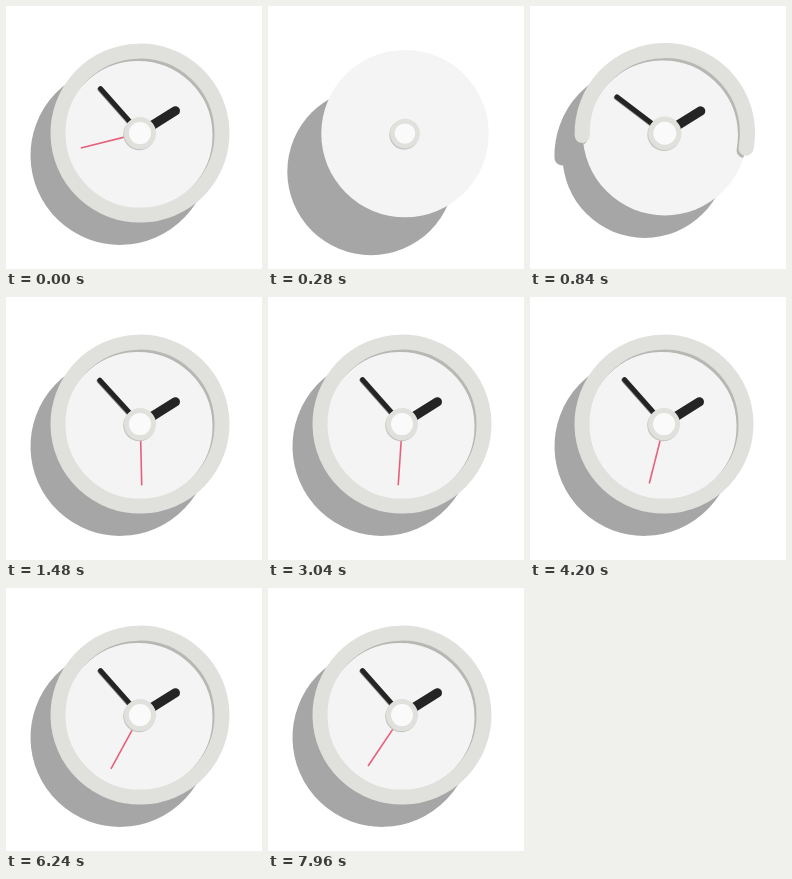
An HTML page with a canvas that plays this animation: 256x263 px, repeating every 8000 ms.

```html
<!DOCTYPE html>
<html lang="en">
<head>
<meta charset="utf-8">
<title>Wall clock</title>
<style>
  html, body { margin: 0; width: 100%; height: 100%; overflow: hidden; background: #fff; }
  canvas { display: block; width: 256px; height: 263px; }
</style>
</head>
<body>
<canvas id="stage" width="256" height="263"></canvas>
<script>
const ctx = document.getElementById('stage').getContext('2d');
const LOOP = 8000, TAU = Math.PI * 2;
const RIM = '#e0e1dc', FACE = '#f4f4f4', SHADOW = '#a6a6a6', INK = '#242424', RED = '#e6607a';

const progress = (t, start, length) => Math.min(1, Math.max(0, (t - start) / length));
const easeOut = u => 1 - (1 - u) ** 3;
const easeInOut = u => (1 - Math.cos(Math.PI * u)) / 2;
const smooth = u => u * u * (3 - 2 * u);
const radians = degrees => degrees * Math.PI / 180;

function disc(x, y, radius, color) {
  ctx.beginPath();
  ctx.arc(x, y, Math.max(0, radius), 0, TAU);
  ctx.fillStyle = color;
  ctx.fill();
}

function rim(x, y, sweep, color) {
  if (sweep <= 0) return;
  const start = radians(178.5);
  ctx.beginPath();
  ctx.arc(x, y, 82, start, start + sweep * TAU);
  ctx.strokeStyle = color;
  ctx.lineWidth = 15;
  ctx.lineCap = 'round';
  ctx.stroke();
}

// Angles run clockwise from twelve o'clock.
function hand(angle, length, width, color, dx = 0, dy = 0, cap = 'round') {
  if (length <= 0) return;
  const a = radians(angle);
  ctx.beginPath();
  ctx.moveTo(dx, dy);
  ctx.lineTo(dx + length * Math.sin(a), dy - length * Math.cos(a));
  ctx.strokeStyle = color;
  ctx.lineWidth = width;
  ctx.lineCap = cap;
  ctx.stroke();
}

// Each second jumps a little too far, then sags back before the next jump.
function secondAngle(t) {
  const ticks = Math.floor((t - 120) / 1000);
  const elapsed = t - 120 - ticks * 1000;
  const jump = 7.3 * smooth(progress(elapsed, 0, 140));
  const sag = 1.3 * progress(elapsed, 140, 860);
  return 170.7 + 6 * ticks + jump - sag - 5;
}

function drawClock(t, second) {
  const lift = 1 - smooth(progress(t, 540, 460));
  const face = easeOut(progress(t, 40, 280));
  const sweep = easeInOut(progress(t, 320, 1000));
  const hour = easeOut(progress(t, 260, 240));
  const minute = easeOut(progress(t, 420, 330));
  const hub = easeOut(progress(t, 180, 240)) * (1 + 0.12 * lift);
  const stretch = 1 + 0.65 * Math.sin(Math.PI * progress(t, 80, 410));
  const radius = 81.5 * face;
  const scale = 1 + 0.03 * lift;

  ctx.save();
  ctx.translate(134 + 3 * lift, 127.1 + 0.5 * lift);
  ctx.scale(scale, scale);

  const shadowX = -20 * stretch, shadowY = 22.3 * stretch;
  disc(shadowX, shadowY, radius, SHADOW);
  rim(shadowX, shadowY, sweep, SHADOW);
  disc(0, 0, radius, FACE);

  // Shade that the rim throws onto the face.
  ctx.save();
  ctx.beginPath();
  ctx.arc(0, 0, radius, 0, TAU);
  ctx.clip();
  rim(-2, 2.3, sweep, '#b7b8b4');
  ctx.restore();
  rim(0, 0, sweep, RIM);

  const hourAngle = 57.8 + 1.4 * lift;
  const minuteAngle = 318.5 - 55 * Math.exp(-Math.max(0, t - 420) / 265);
  hand(hourAngle, 41.7 * hour, 9.4 * hour, INK);
  hand(minuteAngle, 59.5 * minute, 5 * minute, '#8c8c8c', -0.7, 0.6);
  hand(minuteAngle, 59.5 * minute, 5 * minute, INK);
  hand(second.angle, 61.3 * second.growth, 1.6, RED, 0.3, 0, 'butt');

  disc(-0.8, 1.2, 16 * hub, '#c6c7c3');
  disc(0, 0, 16 * hub, RIM);
  disc(0, 0, 11 * hub, '#fafafa');
  ctx.restore();
}

function render(t) {
  ctx.fillStyle = '#fff';
  ctx.fillRect(0, 0, 256, 263);
  if (t < 40) drawClock(LOOP, { angle: 256, growth: 1 });
  else drawClock(t, { angle: secondAngle(t), growth: easeOut(progress(t, 1040, 360)) });
}

const began = performance.now();
function frame() {
  render((performance.now() - began) % LOOP);
  requestAnimationFrame(frame);
}
frame();
</script>
</body>
</html>
```
